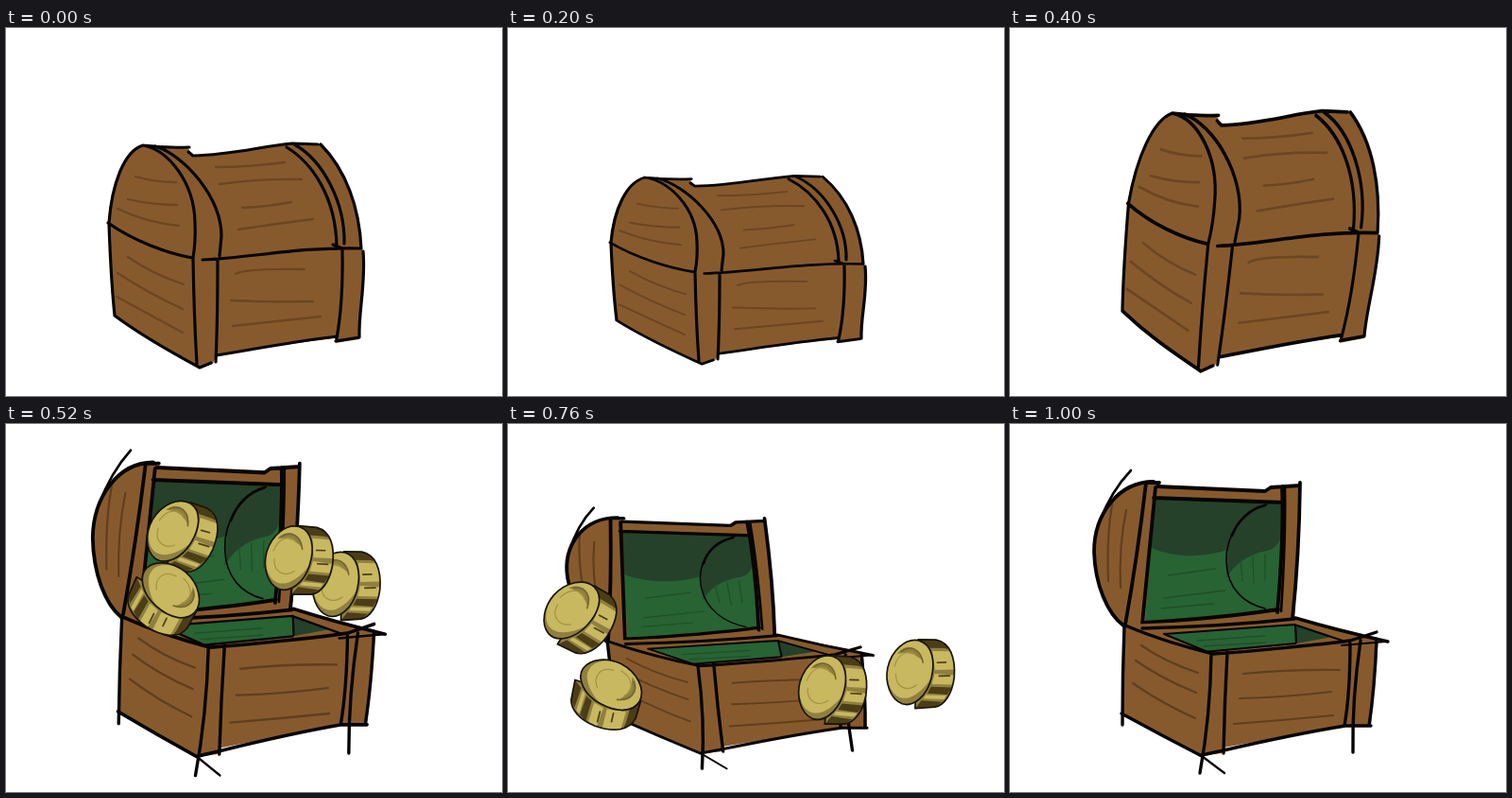
Write an HTML page with a canvas that moves like this. It is 525 px wide and 389 px high and loops after 1360 ms.

```html
<!DOCTYPE html>
<html lang="en">
<head>
<meta charset="utf-8">
<title>Treasure chest</title>
<style>
html, body { margin: 0; width: 100%; height: 100%; overflow: hidden; background: #fff; }
canvas { display: block; }
</style>
</head>
<body>
<canvas id="stage" width="525" height="389"></canvas>
<script>
const ctx = document.getElementById('stage').getContext('2d');
const LOOP = 1360, STEP = 40, END = 1000, FLOOR = 335;
const OPEN_AT = 440, COINS_END = 880;
const BROWN = '#875a2e', GREEN = '#286333', DARK_GREEN = '#25412a';
const GOLD = '#c8b85f', OLIVE = '#8f8040', UMBER = '#4b3d16', INK = '#070504';

const fill = (color, d) => { ctx.fillStyle = color; ctx.fill(new Path2D(d)); };
const line = (color, width, d) => {
  ctx.strokeStyle = color;
  ctx.lineWidth = width;
  ctx.stroke(new Path2D(d));
};

function drawClosed() {
  fill(BROWN, 'M108 206C111 165 124 129 145 123L192 126 198 135C240 134 270 125 303 121L332 123C361 150 375 190 377 233C381 270 373 300 374 329L349 333 348 328C310 332 260 340 222 347L219 355 204 359C180 346 150 330 114 304Z');
  line('#6c4621', 2.3, 'M137 157Q158 163 180 163M129 181Q155 187 181 187M118 191Q150 206 183 209' +
    'M129 242Q155 260 188 271M118 259Q150 280 187 297M117 284Q150 302 187 322' +
    'M222 147Q258 147 295 142M226 165Q268 159 313 160M250 190Q276 189 302 184M246 213Q285 207 325 202' +
    'M243 260Q252 254 316 255M238 288Q280 290 325 289M240 315Q285 310 333 305');
  line(INK, 3.2, 'M109 206C112 165 125 130 145 124C172 129 199 163 200 205Q201 225 198 243' +
    'M145 124Q170 127 194 126M158 125C190 135 228 180 228 220L226 241' +
    'M193 131L198 135C240 134 270 125 303 122L330 123' +
    'M297 126C325 143 349 180 350 230M305 123C336 140 359 185 358 228' +
    'M333 123C360 150 374 190 376 233' +
    'M108 206C135 225 170 238 197 243M208 245C260 243 310 231 376 233M346 229L356 233' +
    'M109 207Q111 265 115 304C150 330 180 345 205 359L217 354' +
    'M198 244Q199 305 202 355M224 246Q224 310 222 353' +
    'M223 346C260 340 300 332 350 326M356 235Q357 290 350 328' +
    'M378 236C381 270 373 300 374 327L349 331');
}

function drawOpen() {
  // lid
  fill(BROWN, 'M152 60C115 60 89 95 89 135C90 170 103 200 120 212L140 216 301 207 308 64 288 66 275 68 270 72 158 66Z');
  fill(GREEN, 'M153 78L289 83 283 197 143 210Z');
  fill(DARK_GREEN, 'M153 78L290 83 288 115Q284 132 272 134C250 138 236 150 229 163L231 133C205 141 175 142 150 131Z');
  line('#1f4f29', 1.3, 'M168 160L217 153M163 184L228 176M160 195L215 190M244 143L246 166M257 140L258 168M270 138L270 165');
  line('#5f3f1e', 2.2, 'M109 81Q102 115 104 166M123 91Q115 130 117 173');
  line(INK, 1.6, 'M272 85C246 90 228 118 229 146C230 174 248 190 270 195');
  line(INK, 2.6, 'M270 86C254 90 241 102 235 118');
  line(INK, 3.8, 'M152 61C115 61 89 95 89 135C90 170 103 200 120 213' +
    'M146 62L158 62M156 66L270 71 276 67 307 65' +
    'M144 62Q135 140 122 212M154 67Q147 140 140 211' +
    'M152 78L290 83M142 210Q225 205 284 196' +
    'M288 66Q290 120 283 199M307 62Q306 140 299 206');
  line(INK, 2.6, 'M128 49Q107 71 95 103M291 68Q292 120 287 198');

  // base
  fill(BROWN, 'M121 212L300 205 390 226 382 319 350 320 226 342 224 348 201 351 118 305Z');
  fill(GREEN, 'M163 222L301 212 338 226 302 232 210 240Z');
  fill(DARK_GREEN, 'M301 212L340 225 303 232Z');
  line('#1f4f29', 1.3, 'M198 229L270 224M205 235L270 231');
  line('#5f3f1e', 2.2, 'M139 234Q165 252 199 263M133 250Q160 269 197 284M130 274Q160 295 196 311' +
    'M247 264Q300 259 349 260M243 290Q290 289 340 283M237 317Q290 313 342 308');
  line(INK, 3.4, 'M122 213Q165 231 215 243M140 216Q225 214 301 206' +
    'M302 205Q350 219 400 230M215 243C260 240 330 233 360 229L388 220' +
    'M121 212Q119 265 119 318M118 306Q160 329 203 351' +
    'M213 243Q212 310 201 369M230 241Q227 295 226 348' +
    'M203 350L226 345Q300 328 355 319L382 319' +
    'M360 232Q360 285 354 319M371 229Q362 290 363 347M388 228Q386 280 380 319');
  line(INK, 2.2, 'M163 222L207 240M163 222L301 212M302 212L303 231M301 212L352 229M205 241L302 232M351 234L398 230M203 351L227 369');
}

function drawCoin(x, y, degrees) {
  const edge = 'M-5-36L14-37C29-35 36-20 36 1C35 19 28 31 18 34L-3 37Z';
  const face = 'M-4-35C10-32 15-15 12 3C9 23-5 36-17 33C-30 29-37 12-35-4C-32-23-18-37-4-35Z';
  ctx.setTransform(1, 0, 0, 1, x, y);
  ctx.rotate(degrees * Math.PI / 180);
  fill(OLIVE, edge);
  fill(UMBER, 'M-4-36L14-37Q23-34 27-29L8-28ZM12 13L34 12 30 20 9 20ZM3 28L25 28 18 34-3 37Z');
  fill(GOLD, 'M11-25L31-26 36-7 15-5ZM15-1L36-1 35 9 13 10ZM7 22L29 21 27 25 5 26Z');
  line(UMBER, 1.7, 'M17-13L26-14M20 1L31 0M18-32L26-29');
  line('#181309', 1.7, edge);
  fill(GOLD, face);
  fill(OLIVE, 'M-34 9C-29 25-20 29-10 26C-1 22 6 14 11 5C8 24-5 36-17 33C-26 30-32 20-34 9Z');
  fill(OLIVE, 'M-26-19C-19-31-4-30 2-13C-6-21-15-23-26-19Z');
  line('#75652d', 1.6, 'M-22-22C-12-31-1-25 2-12');
  line('#a39245', 1.2, 'M-28-6C-25-21-12-26-5-18M-26 2C-25 17-12 20-3 12');
  line('#181309', 1.7, face);
}

// x, y and angle of each coin at the times in COIN_TIMES, back to front
const COIN_TIMES = [OPEN_AT, 520, 640, 840, COINS_END];
const COINS = [
  [[236, 186, 124, 46, 38], [105, 118, 152, 239, 252], [18, 22, 33, 33, 33]],
  [[201, 168, 129, 91, 86], [157, 184, 228, 324, 337], [126, 122, 110, 110, 110]],
  [[324, 360, 402, 458, 466], [146, 171, 212, 299, 312], [4, 4, 4, 4, 4]],
  [[295, 310, 328, 353, 357], [98, 144, 212, 325, 338], [8, 8, 8, 8, 8]]
];

// chest keys: time, height scale, sideways lean
const CLOSED_KEYS = [[0, 1, 0], [200, .839, 0], [400, 1.161, -.128]];
const OPEN_KEYS = [[OPEN_AT, 1.145, -.062], [760, .862, .13], [END, 1, 0]];

function lerpKeys(keys, t) {
  const i = t < keys[1][0] ? 0 : 1;
  const [a, b] = [keys[i], keys[i + 1]];
  const p = (t - a[0]) / (b[0] - a[0]);
  return [1, 2].map(n => a[n] + (b[n] - a[n]) * p);
}

// smooth curve through the values of one track
function spline(values, t) {
  const T = COIN_TIMES, last = T.length - 1;
  let i = 0;
  while (i < last - 1 && t >= T[i + 1]) i++;
  const slope = n => {
    const a = Math.max(n - 1, 0), b = Math.min(n + 1, last);
    return (values[b] - values[a]) / (T[b] - T[a]);
  };
  const h = T[i + 1] - T[i], p = (t - T[i]) / h, q = 1 - p;
  return values[i] * q * q * (1 + 2 * p) + values[i + 1] * p * p * (3 - 2 * p) +
    h * p * q * (slope(i) * q - slope(i + 1) * p);
}

function draw() {
  const t = Math.min(END, Math.floor(performance.now() % LOOP / STEP) * STEP);
  const open = t >= OPEN_AT;
  const [scale, lean] = lerpKeys(open ? OPEN_KEYS : CLOSED_KEYS, t);
  ctx.setTransform(1, 0, 0, 1, 0, 0);
  ctx.fillStyle = '#fff';
  ctx.fillRect(0, 0, 525, 389);
  ctx.lineCap = ctx.lineJoin = 'round';
  ctx.setTransform(1, 0, lean, scale, -FLOOR * lean, FLOOR * (1 - scale));
  if (open) drawOpen(); else drawClosed();
  if (open && t <= COINS_END) {
    for (const coin of COINS) drawCoin(...coin.map(track => spline(track, t)));
  }
  requestAnimationFrame(draw);
}
draw();
</script>
</body>
</html>
```
